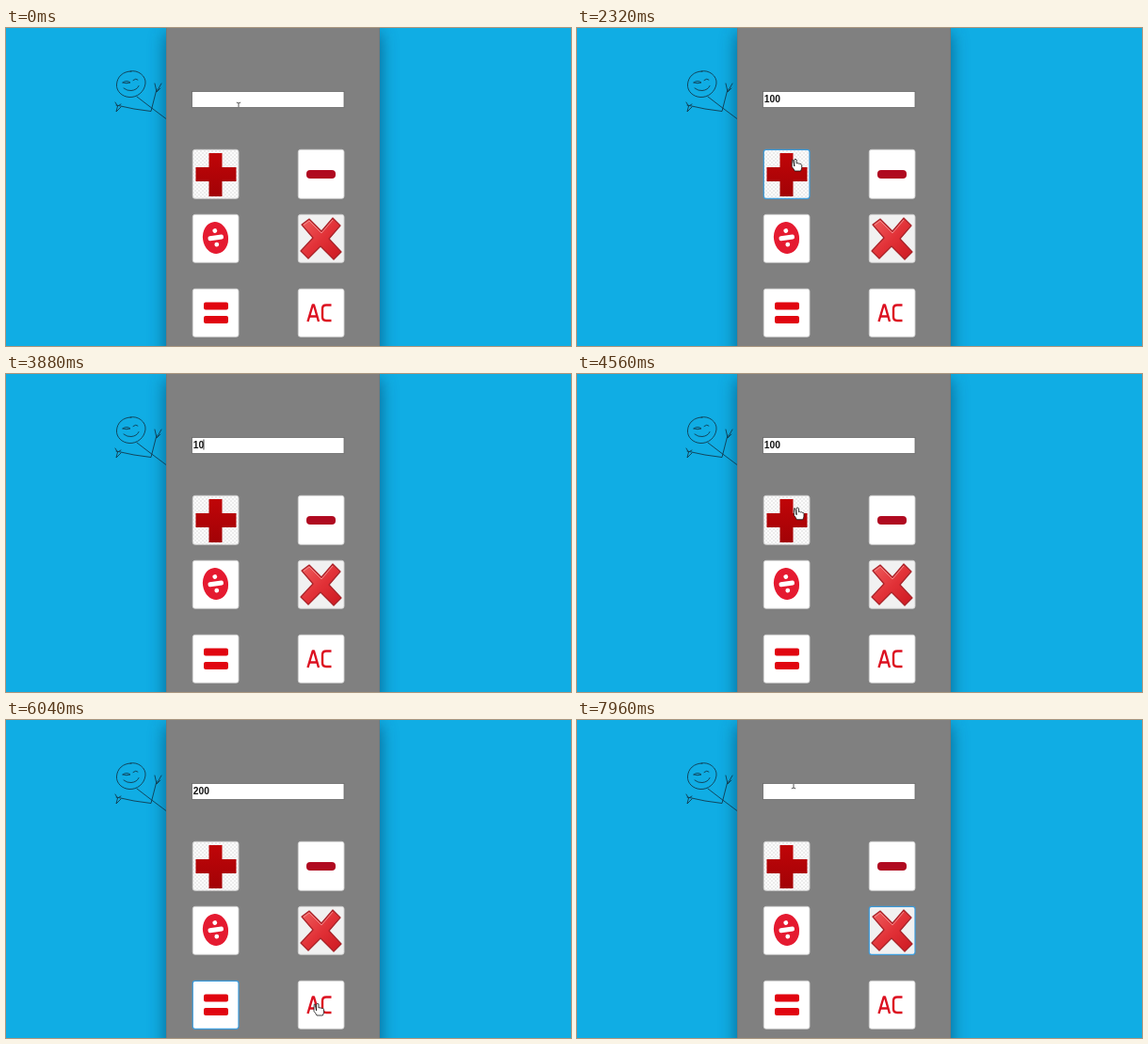
Write an HTML page that moves like this. It is 600 by 338 pixels and loops after 8 s.

```html
<!DOCTYPE html>
<html lang="en">
<head>
<meta charset="utf-8">
<title>Calculator</title>
<style>
  html, body { margin: 0; width: 100%; height: 100%; overflow: hidden; background: #10ade4; }
  svg { display: block; width: 100vw; height: 100vh; }
  #value { font: bold 10.3px "Liberation Sans", Arial, sans-serif; fill: #151515; }
</style>
</head>
<body>
<svg viewBox="0 0 600 338" preserveAspectRatio="none">
  <defs>
    <filter id="blur" x="-30%" y="-20%" width="160%" height="140%"><feGaussianBlur stdDeviation="9"/></filter>
    <pattern id="checker" width="4" height="4" patternUnits="userSpaceOnUse">
      <path d="M0 0h4v4H0z" fill="#fcfcfc"/><path d="M0 0h2v2H0zM2 2h2v2H2z" fill="#ececec"/>
    </pattern>
    <linearGradient id="plusRed" x1="0" y1="0" x2="0" y2="1">
      <stop offset="0" stop-color="#c00508"/><stop offset="1" stop-color="#a20206"/>
    </linearGradient>
    <linearGradient id="crossRed" x1="0" y1="0" x2="1" y2="1">
      <stop offset="0" stop-color="#f06060"/><stop offset=".5" stop-color="#e23238"/><stop offset="1" stop-color="#cc1820"/>
    </linearGradient>
    <clipPath id="fieldClip"><path d="M198 68h161v16H198z"/></clipPath>
  </defs>

  <path d="M0 0h600v338H0z" fill="#10ade4"/>
  <g fill="none" stroke="#123c50" stroke-width=".9" stroke-linecap="round" stroke-linejoin="round">
    <path d="M132 46C140 44 149 51 148 59C147 68 139 74 131 73.500C123 73 117 67 117.500 60C118 52 124 46 133 46"/>
    <path d="M124 58q4-3 8 0q-4 1.500-8 0M135 55.500q3-2.500 5-.5M125 64q4 3 8 2.500q6-.5 8-5"/>
    <path d="M139 73L152 83L172 98M117 82L136 86L154 88.500L160 65"/>
    <path d="M116 79L118.500 83L122 81M118.500 83L117 89L122 84M158 59L160 68L165 59M160 68L164 64"/>
  </g>

  <rect x="169" y="6" width="229" height="350" fill="#003a5c" opacity=".6" filter="url(#blur)"/>
  <path d="M170 0h227v338H170z" fill="#808080"/>
  <path d="M396.500 0V338M170.500 0V338" stroke="#74797b"/>
  <rect x="197.500" y="67.500" width="161.500" height="17" fill="#fff" stroke="#686868" stroke-width=".8"/>
  <text id="value" x="198.700" y="79"></text>
  <path id="caret" d="M0 69.500V80.500" stroke="#222" stroke-width=".9"/>

  <g id="buttons"></g>

  <path d="M215.500 133h14v15H244.500v15H229.500v16h-14v-16H201.500v-15H215.500z" fill="url(#plusRed)"/>
  <rect x="319" y="151" width="31" height="9" rx="4" fill="#b00a20"/>
  <g transform="rotate(-8 222.500 223)">
    <ellipse cx="222.500" cy="223" rx="13.500" ry="17" fill="#e51a30"/>
    <rect x="214.500" y="220.500" width="16.500" height="5" rx="2" fill="#fff"/>
    <circle cx="222.800" cy="215.500" r="2.400" fill="#fff"/><circle cx="222.800" cy="230.300" r="2.400" fill="#fff"/>
  </g>
  <path d="M314 209L322 203L335 216L347 202L355 210L343 224L356 238L348 246L334 232L321 245L313 237L326 223z"
        fill="url(#crossRed)" stroke="#a8242a" stroke-width="1.200" stroke-linejoin="round"/>
  <path d="M316 209.500L322 205L335 218L347 204" fill="none" stroke="#f59b9b" stroke-width=".8"/>
  <g fill="#e10510">
    <rect x="210" y="291.500" width="26" height="8" rx="2"/><rect x="210" y="306" width="26" height="8" rx="2"/>
  </g>
  <path role="img" aria-label="AC" fill="none" stroke="#dc1020" stroke-width="2.400" stroke-linejoin="round"
        d="M320.500 312L325.700 294.500H327L332 312M322.500 306.500H330M345.500 294.500H340Q336 294.500 336 298.500V307Q336 311 340 311H345.500"/>

  <g id="ibeam" clip-path="url(#fieldClip)">
    <path id="ibeamShape" d="M-2.200-4.800Q0-4.800 0-3.800Q0-4.800 2.200-4.800M0-4V4M-2.200 4.800Q0 4.800 0 3.800Q0 4.800 2.200 4.800"
          fill="none" stroke="#444" stroke-width=".9"/>
  </g>
  <path id="arrow" d="M0 0V12L2.800 9.500L4.700 13.500L6.500 12.700L4.700 8.800H8.500z" fill="#fff" stroke="#111" stroke-width=".7"/>
  <path id="hand" d="M-1.200 1Q0-.6 1.200 1V5Q2.200 4 3.200 5.200Q4.200 4.500 5 5.700Q6.200 5 6.700 6.500V9.500Q6.500 11 5.500 13H-.8Q-2 10.500-3.800 8.500Q-4-6.700-1.200 8z"
        fill="#fff" stroke="#111" stroke-width=".8" stroke-linejoin="round"/>
</svg>
<script>
const $ = id => document.getElementById(id);
const LOOP = 8000;

// x, y, height, fill, highlight start and end
const buttons = [
  [198, 129, 52, "url(#checker)", 2220, 3050],
  [310, 129, 52, "#fff", 0, 0],
  [198, 198, 51, "#fff", 0, 0],
  [310, 198, 51, "#f1f1f1", 7420, 8000],
  [198, 277, 51, "#fff", 4940, 6180],
  [310, 277, 51, "#fff", 6180, 6850]
];

const typed = [
  [0, ""], [1080, "1"], [1440, "10"], [1640, "100"], [2480, ""],
  [3680, "1"], [3840, "10"], [4080, "100"], [5200, "200"], [6240, ""],
  [7080, "5"], [7200, "50"], [7560, ""]
];

// time, x, y
const path = [
  [0, 247, 84], [1800, 247, 82], [2280, 232, 139], [2560, 232, 139],
  [3050, 238, 77], [4320, 238, 77], [5000, 225, 302], [5400, 225, 302],
  [6100, 333, 301], [6320, 333, 301], [6880, 240, 79.5], [7160, 240, 79.5],
  [7460, 333, 221], [7600, 333, 221], [7960, 230, 68], [8000, 230, 68]
];
const focused = [[0, 2280], [3050, 5060], [6880, 7500]];
const hidden = [[1040, 1800], [3600, 4320], [7060, 7180]];

const within = (t, spans) => spans.some(([a, b]) => t >= a && t < b);
const show = (el, on) => el.setAttribute("visibility", on ? "visible" : "hidden");
const place = (el, x, y) => el.setAttribute("transform", `translate(${x} ${y})`);

const frames = buttons.map(([x, y, h, fill]) => {
  const r = document.createElementNS("http://www.w3.org/2000/svg", "rect");
  const attrs = { x: x + .3, y: y + .3, width: 48.7, height: h, rx: 2.5, fill };
  for (const k in attrs) r.setAttribute(k, attrs[k]);
  return $("buttons").appendChild(r);
});

function pointer(t) {
  const i = path.findIndex(p => p[0] > t);
  const [t0, x0, y0] = path[i - 1], [t1, x1, y1] = path[i];
  const u = (t - t0) / (t1 - t0), e = u * u * (3 - 2 * u);
  return [x0 + (x1 - x0) * e, y0 + (y1 - y0) * e];
}

function draw(t) {
  const text = typed.filter(k => k[0] <= t).pop()[1];
  $("value").textContent = text;
  place($("caret"), 199.3 + text.length * 5.73 - (text ? .8 : 0), 0);
  show($("caret"), within(t, focused) && t % 1060 >= 530);

  buttons.forEach(([, , , , from, to], i) => {
    const hot = t >= from && t < to;
    frames[i].setAttribute("stroke", hot ? "#3b9bdb" : "#cfcfcf");
    frames[i].setAttribute("stroke-width", hot ? 1.2 : .9);
  });

  const [x, y] = pointer(t);
  const visible = !within(t, hidden);
  const inField = x > 197 && x < 360 && y > 66 && y < 86;
  const onButton = buttons.some(([bx, by, h]) => x > bx && x < bx + 49 && y > by && y < by + h);
  place($("ibeamShape"), x, y);
  place($("arrow"), x, y);
  place($("hand"), x, y);
  show($("ibeam"), visible && inField);
  show($("hand"), visible && onButton);
  show($("arrow"), visible && !inField && !onButton);
}

const start = performance.now();
function tick() {
  draw((performance.now() - start) % LOOP);
  requestAnimationFrame(tick);
}
tick();
</script>
</body>
</html>
```
